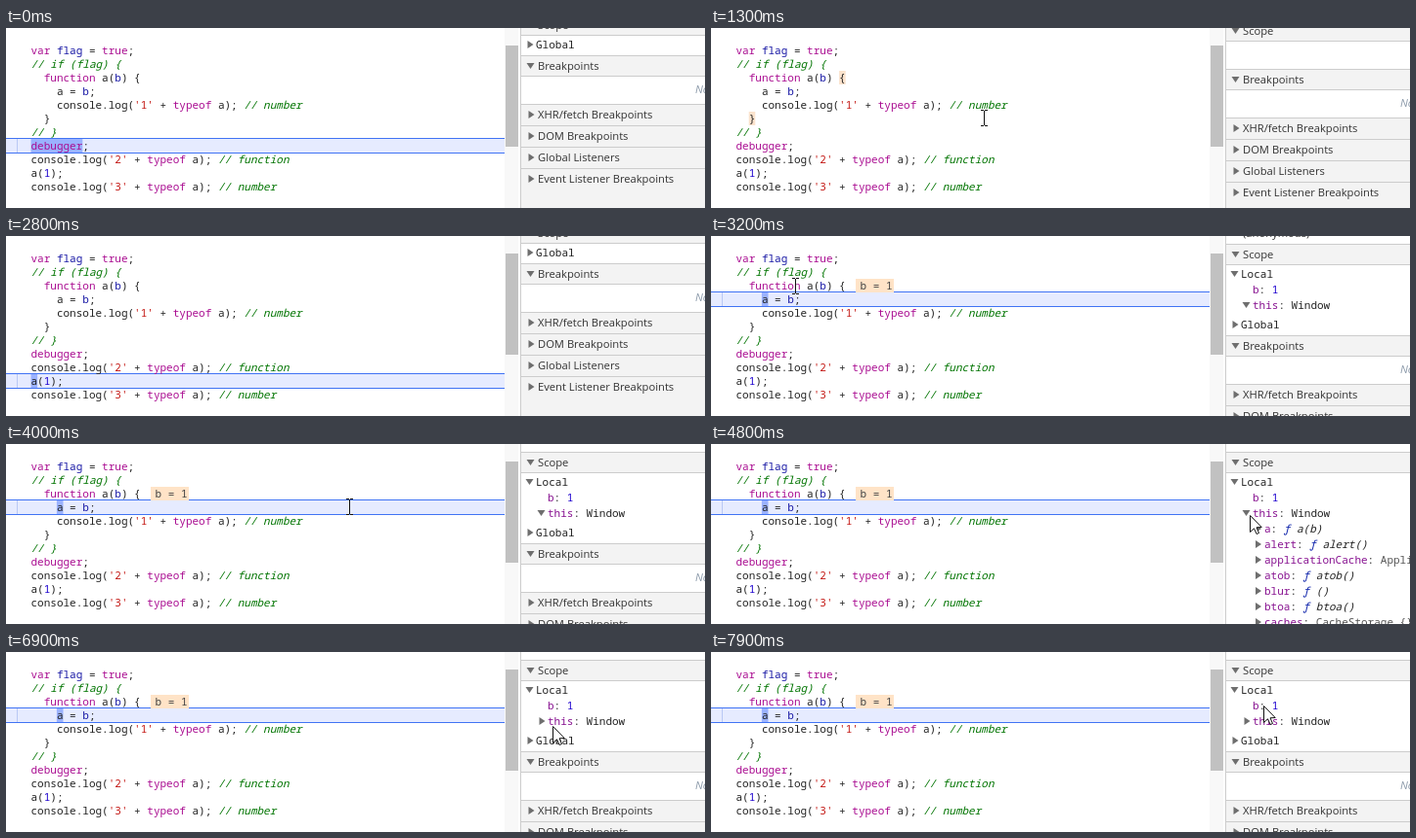
Animation, 715 px wide and 185 px high, one loop 8 s. Source, as an HTML page with a canvas:

```html
<!DOCTYPE html>
<html lang="en">
<head>
<meta charset="utf-8">
<title>Debugger stepping</title>
<style>
html, body { margin: 0; width: 100%; height: 100%; overflow: hidden; background: #fff; }
canvas { display: block; width: 715px; height: 185px; }
</style>
</head>
<body>
<canvas id="stage"></canvas>
<script>
const W = 715, H = 185, LOOP = 8000, TICK = 100;
const CHAR = 6.6, CODE_X = 25.5, LINE_H = 14, CODE_Y = 16;
const MONO = '11px "Noto Sans Mono", "DejaVu Sans Mono", monospace';
const SANS = '11.2px "Open Sans", "Noto Sans", sans-serif';
const PROP = '#881391', NUM = '#1c00cf', INK = '#222';

const canvas = document.getElementById('stage');
const ctx = canvas.getContext('2d');
const ratio = window.devicePixelRatio || 1;
canvas.width = W * ratio;
canvas.height = H * ratio;

const code = [
  'var flag = true;',
  '// if (flag) {',
  '  function a(b) {',
  '    a = b;',
  "    console.log('1' + typeof a); // number",
  '  }',
  '// }',
  'debugger;',
  "console.log('2' + typeof a); // function",
  'a(1);',
  "console.log('3' + typeof a); // number"
];

const rules = [
  [/^\/\/.*/, '#007400', 'italic '],
  [/^'[^']*'/, '#c41a16', ''],
  [/^(var|true|function|typeof|debugger)\b/, '#aa0d91', ''],
  [/^\d+/, NUM, ''],
  [/^(flag|b)\b/, '#1a1aa6', ''],
  [/^(\w+|\s+|.)/, INK, '']
];

// Rows of the expanded object; a function shows its signature, by default name()
const members = [
  { name: 'a', signature: 'a(b)' },
  { name: 'alert' },
  { name: 'applicationCache', value: 'ApplicationCache {}' },
  { name: 'atob' },
  { name: 'blur', signature: '()' },
  { name: 'btoa' },
  { name: 'caches', value: 'CacheStorage {}' }
];

// Pointer path: time, x, y
const path = [
  [100, 364, 144], [700, 279, 97], [1000, 279, 97], [1100, 279, 92],
  [1300, 279, 92], [1600, 272, 96], [1800, 272, 96], [2000, 260, 101],
  [2200, 260, 101], [2600, 82, 58], [3100, 82, 58], [3200, 86, 51],
  [3400, 95, 49], [3500, 95, 49], [4400, 556, 76], [4800, 551, 73],
  [5000, 583, 82], [5100, 583, 82], [5200, 584, 84], [5400, 584, 84],
  [5700, 629, 86], [6000, 604, 71], [6300, 560, 66], [6600, 549, 70],
  [6800, 549, 70], [7200, 587, 94], [7500, 556, 72], [7900, 565, 55]
];

function pointerAt(t) {
  const i = path.findIndex(p => p[0] > t);
  if (i < 0) return path[path.length - 1].slice(1);
  const a = path[Math.max(0, i - 1)], b = path[i];
  const k = i ? (t - a[0]) / (b[0] - a[0]) : 0;
  return [1, 2].map(j => Math.round(a[j] + (b[j] - a[j]) * k));
}

function rect(x, y, w, h, color) {
  ctx.fillStyle = color;
  ctx.fillRect(x, y, w, h);
}

function text(str, x, y, color = INK, font = MONO) {
  ctx.font = font;
  ctx.fillStyle = color;
  ctx.fillText(str, x, y);
}

function poly(points, color) {
  ctx.beginPath();
  points.forEach(([x, y]) => ctx.lineTo(x, y));
  ctx.closePath();
  ctx.fillStyle = color;
  ctx.fill();
}

function triangle(x, y, open) {
  poly(open
    ? [[x - 4, y - 3], [x + 4, y - 3], [x, y + 3]]
    : [[x - 2, y - 4], [x + 4, y], [x - 2, y + 4]], '#6e6e6e');
}

function drawCodeLine(line, row) {
  let col = 0;
  while (col < line.length) {
    const rest = line.slice(col);
    const [re, color, style] = rules.find(r => r[0].test(rest));
    const word = rest.match(re)[0];
    text(word, CODE_X + col * CHAR, CODE_Y + row * LINE_H + 11, color, style + MONO);
    col += word.length;
  }
}

function drawExecution(row, col, len) {
  const y = CODE_Y + row * LINE_H;
  rect(0, y, 510, LINE_H, '#e6ebff');
  rect(0, y - 1, 510, 1, '#4073f4');
  rect(0, y + LINE_H, 510, 1, '#4073f4');
  rect(11, y, 1, LINE_H, '#b9c8f5');
  rect(CODE_X + col * CHAR, y, len * CHAR, LINE_H, 'rgba(15,72,252,.35)');
}

function drawEditor(t) {
  if (t < 1300) drawExecution(7, 0, 8);
  else if (t >= 1400 && t < 1800) drawExecution(8, 0, 7);
  else if (t >= 1800 && t < 3100) drawExecution(9, 0, 1);
  else if (t >= 3200) drawExecution(3, 4, 1);

  if (t >= 500 && t < 1400) {
    for (const [row, col] of [[2, 16], [5, 2]])
      rect(CODE_X + col * CHAR, CODE_Y + row * LINE_H, CHAR, LINE_H, '#fbe3cd');
  }
  code.forEach(drawCodeLine);

  if (t >= 3200) {
    rect(148, 44, 39, 14, '#ffe3c7');
    text('b = 1', 152.5, 55, '#444');
  }
  rect(510, 0, 14, H, '#f8f8f8');
  rect(511, 18, 13, 104, '#c1c1c1');
}

function header(label, y, open) {
  rect(527, y - 11, W - 527, 22, '#f3f3f3');
  rect(527, y - 11, W - 527, 1, '#ccc');
  if (open) rect(527, y + 10, W - 527, 1, '#ccc');
  triangle(536.5, y, open);
  text(label, 544, y + 4, '#333', SANS);
}

function property(name, value, x, y, color) {
  text(name, x, y + 4, PROP);
  text(':', x + name.length * CHAR, y + 4);
  text(value, x + (name.length + 2) * CHAR, y + 4, color);
}

function member({ name, value, signature = name + '()' }, y) {
  const x = 566;
  triangle(559, y, false);
  if (value) return property(name, value, x, y, '#565656');
  property(name, '', x, y);
  const vx = x + (name.length + 2) * CHAR;
  text('ƒ', vx, y + 4, '#0d22aa', 'italic ' + MONO);
  text(signature, vx + 2 * CHAR, y + 4, INK, 'italic ' + MONO);
}

function scopeRow(label, y, open) {
  triangle(535.5, y, open);
  text(label, 542, y + 4);
}

function drawSections(y) {
  rect(527, y - 11, W - 527, H, '#f3f3f3');
  header('Breakpoints', y, true);
  rect(527, y + 11, W - 527, 28, '#fff');
  text('No breakpoints', 705, y + 28, '#8d9bab', 'italic ' + SANS);
  ['XHR/fetch Breakpoints', 'DOM Breakpoints', 'Global Listeners', 'Event Listener Breakpoints']
    .forEach((label, i) => header(label, y + 50 + i * 22, false));
}

function drawLocalScope(t, pointerX) {
  const expanded = t >= 4200 && t < 6700;
  if (t < 3300) text('(anonymous)', 544, 1, '#333', SANS);
  header('Scope', 19, true);
  scopeRow('Local', 39, true);
  property('b', '1', 554, 55, NUM);
  triangle(547.5, 71, t < 6700);
  property('this', 'Window', 554, 71, INK);
  if (expanded) {
    if (t >= 5500) {
      const end = t < 5700 ? Math.min(pointerX, 625) : 625;
      rect(586, 80, end - 586, 15, '#b5d7fb');
    }
    members.forEach((m, i) => member(m, 87 + i * 16));
  } else {
    scopeRow('Global', 91, false);
    drawSections(113);
  }
}

function drawSidebar(t, pointerX) {
  const running = (t >= 1300 && t < 1400) || (t >= 3100 && t < 3200);
  ctx.save();
  ctx.beginPath();
  ctx.rect(524, 0, W - 524, H);
  ctx.clip();
  rect(524, 0, W - 524, H, '#fff');
  if (running) {
    header('Scope', 3, true);
    drawSections(53);
  } else if (t < 3100) {
    header('Scope', -3, true);
    scopeRow('Global', 17, false);
    drawSections(39);
  } else {
    drawLocalScope(t, pointerX);
  }
  rect(526, 0, 1, H, '#ccc');
  ctx.restore();
}

function drawBeam(x, y) {
  rect(x, y - 7, 1, 15, '#111');
  for (const end of [y - 8, y + 8]) {
    rect(x - 3, end, 3, 1, '#111');
    rect(x + 1, end, 3, 1, '#111');
  }
}

function drawArrow(x, y) {
  const shape = [[0, 0], [0, 17], [4, 13.3], [6.6, 19], [9, 18], [6.5, 12.3], [11.7, 12]];
  poly(shape.map(([dx, dy]) => [x + .5 + dx, y + .5 + dy]), '#fff');
  ctx.strokeStyle = '#111';
  ctx.lineWidth = 1;
  ctx.stroke();
}

function draw(t) {
  const [x, y] = pointerAt(t);
  ctx.setTransform(ratio, 0, 0, ratio, 0, 0);
  rect(0, 0, W, H, '#fff');
  drawEditor(t);
  drawSidebar(t, x);
  const hidden = t < 100 || (t >= 2800 && t < 3200);
  if (!hidden) (x < 510 ? drawBeam : drawArrow)(x, y);
}

const start = performance.now();
function frame() {
  const t = (performance.now() - start) % LOOP;
  draw(Math.floor(t / TICK) * TICK);
  requestAnimationFrame(frame);
}
frame();
</script>
</body>
</html>
```
